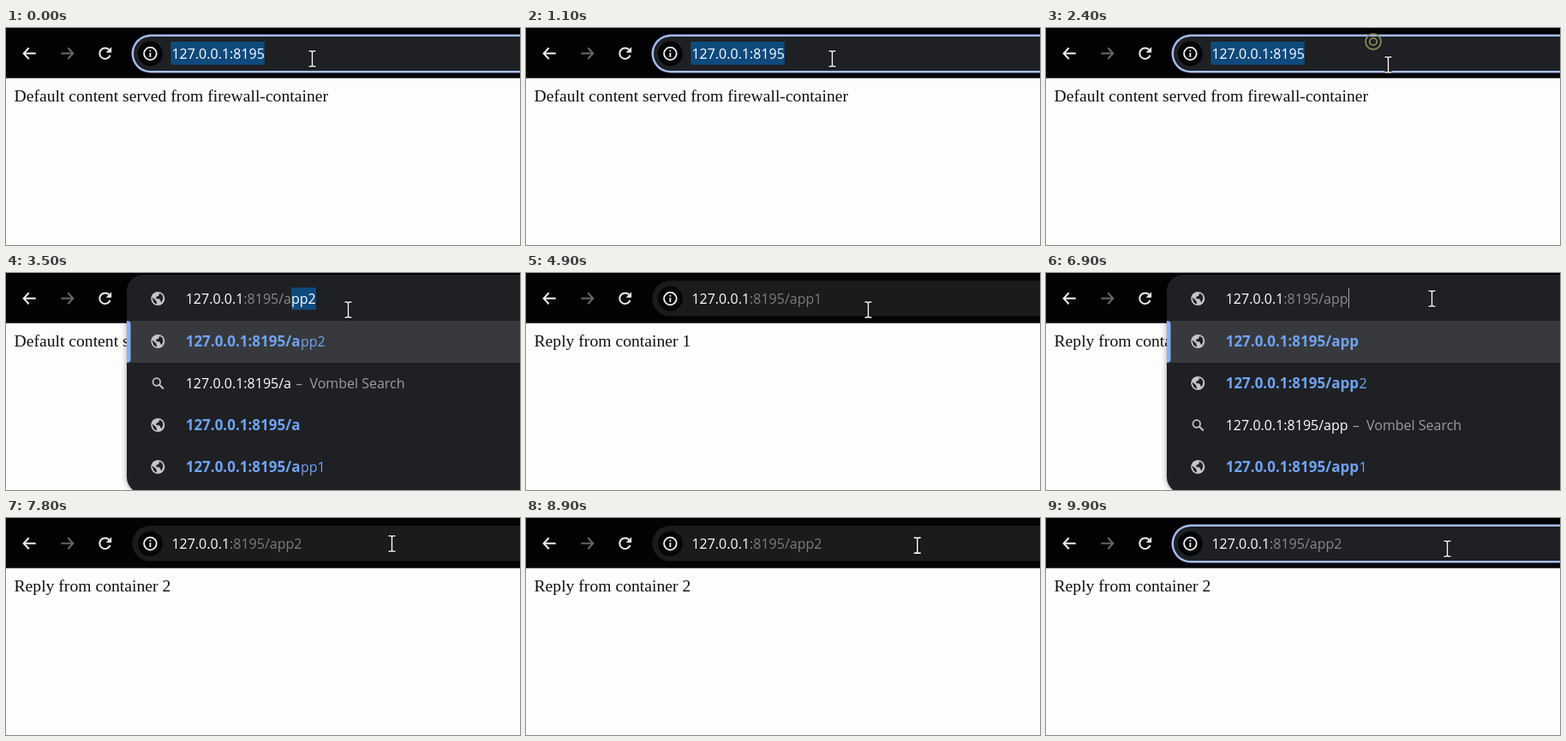
An HTML page with a canvas for the animation above (10000 ms loop, 600 by 254 pixels).

```html
<!DOCTYPE html>
<html lang="en">
<head>
<meta charset="utf-8">
<title>Routing by path</title>
<style>
html, body { margin: 0; width: 100%; height: 100%; overflow: hidden; background: #fefdfe; }
canvas { display: block; width: 600px; height: 254px; }
</style>
</head>
<body>
<canvas id="stage" width="600" height="254"></canvas>
<script>
const ctx = document.getElementById('stage').getContext('2d');
const LOOP = 10000, STEP = 100;
const HOST = '127.0.0.1', PORT = ':8195';
const UI = '16px "Open Sans", "Noto Sans", sans-serif';
const UI_BOLD = 'bold 17px "Open Sans", "Noto Sans", sans-serif';
const SERIF = '19.65px "Liberation Serif", serif';
const WHITE = '#ffffff', GREY = '#88898c', BLUE = '#6fa3f5', PANEL = '#1f2023', SELECT = '#0f4a7c';

// Each scene holds until the next one starts.
const scenes = [
  { at: 0, page: 'Default content served from firewall-container', path: '', focus: true, all: true },
  { at: 2900, typed: '/', rest: 'app2', rows: ['/app2', '?', '/', '/app1'] },
  { at: 3300, typed: '/a', rest: 'pp2', rows: ['/app2', '?', '/a', '/app1'] },
  { at: 3900, typed: '/ap', rest: 'p2', rows: ['/app2', '?', '/ap', '/app1'] },
  { at: 4000, typed: '/app', rest: '', rows: ['/app', '/app2', '?', '/app1'] },
  { at: 4400, typed: '/app1', rest: '', rows: ['/app1', '?'] },
  { at: 4600, page: 'Reply from container 1', path: '/app1' },
  { at: 5800, path: '/app1', focus: true, all: true },
  { at: 6100, path: '/app1', focus: true, caret: true },
  { at: 6400, typed: '/app', rest: '', rows: ['/app', '/app2', '?', '/app1'] },
  { at: 7100, typed: '/app2', rest: '', rows: ['/app2', '?'] },
  { at: 7300, page: 'Reply from container 2', path: '/app2' },
  { at: 9300, path: '/app2', focus: true }
];

// Pointer keys: time, x, y.
const pointer = [
  [0, 357, 36], [1700, 357, 36], [2100, 382, 16], [2200, 382, 16], [2400, 399, 43],
  [5500, 399, 43], [5800, 450, 30], [8700, 450, 30], [9200, 468, 36]
];

function pointerAt(t) {
  const i = pointer.findIndex(k => k[0] > t);
  if (i < 0) return pointer[pointer.length - 1].slice(1);
  const [t0, x0, y0] = pointer[i - 1], [t1, x1, y1] = pointer[i];
  const p = (t - t0) / (t1 - t0), e = p * p * (3 - 2 * p);
  return [x0 + (x1 - x0) * e, y0 + (y1 - y0) * e];
}

function rect(x, y, w, h, color) {
  ctx.fillStyle = color;
  ctx.fillRect(x, y, w, h);
}

function round(x, y, w, h, r, color) {
  ctx.beginPath();
  ctx.roundRect(x, y, w, h, r);
  ctx.fillStyle = color;
  ctx.fill();
}

function disc(x, y, r, color) {
  ctx.beginPath();
  ctx.arc(x, y, r, 0, 7);
  ctx.fillStyle = color;
  ctx.fill();
}

function circle(x, y, r, color, width) {
  ctx.beginPath();
  ctx.arc(x, y, r, 0, 7);
  stroke(color, width);
}

function stroke(color, width) {
  ctx.strokeStyle = color;
  ctx.lineWidth = width;
  ctx.stroke();
}

function line(points, color, width) {
  ctx.beginPath();
  points.forEach(([x, y]) => ctx.lineTo(x, y));
  stroke(color, width);
}

// Draws text and returns the x where it ends.
function write(str, x, y, color, font = UI) {
  ctx.font = font;
  ctx.fillStyle = color;
  ctx.fillText(str, x, y);
  return x + ctx.measureText(str).width;
}

function arrow(x, dir, color) {
  line([[x - 7 * dir, 29.7], [x + 7 * dir, 29.7]], color, 2);
  line([[x + dir, 23.2], [x + 7 * dir, 29.7], [x + dir, 36.2]], color, 2);
}

function reload() {
  ctx.beginPath();
  ctx.arc(115.6, 29.7, 6.3, 0.35, 5.5);
  stroke('#f2f2f2', 2);
  ctx.beginPath();
  ctx.moveTo(123.1, 22.2);
  ctx.lineTo(123.1, 28.7);
  ctx.lineTo(116.6, 28.7);
  ctx.fillStyle = '#f2f2f2';
  ctx.fill();
}

function infoIcon() {
  const x = 168.4, y = 30;
  disc(x, y, 14.5, '#050507');
  circle(x, y, 7.3, '#f2f2f2', 1.8);
  rect(x - 0.9, y - 1, 1.8, 5, '#f2f2f2');
  rect(x - 0.9, y - 4.2, 1.8, 1.8, '#f2f2f2');
}

function globe(x, y) {
  disc(x, y, 8, '#c4c5c8');
  ctx.beginPath();
  ctx.moveTo(x - 6.5, y - 1.5);
  ctx.lineTo(x - 2, y + 2.5);
  ctx.lineTo(x - 1, y + 6.4);
  ctx.quadraticCurveTo(x - 6.5, y + 5, x - 6.5, y - 1.5);
  ctx.moveTo(x + 2, y - 6.2);
  ctx.lineTo(x + 1, y - 3.5);
  ctx.lineTo(x - 2, y - 2);
  ctx.lineTo(x - 2, y);
  ctx.lineTo(x + 2, y + 0.5);
  ctx.lineTo(x + 4, y + 4.5);
  ctx.quadraticCurveTo(x + 9, y - 3, x + 2, y - 6.2);
  ctx.fillStyle = PANEL;
  ctx.fill();
}

function lens(x, y) {
  circle(x - 1.5, y - 1.5, 4.3, '#c4c5c8', 1.7);
  line([[x + 1.5, y + 1.5], [x + 6.5, y + 6.5]], '#c4c5c8', 2);
}

function caret(x) {
  rect(Math.round(x), 18, 1, 23, '#a8a8aa');
}

function addressBar(s) {
  if (s.focus) {
    round(146.5, 7.5, 480, 45, 22.5, '#a5bdf0');
    round(149, 10, 475, 40, 20, PANEL);
  } else {
    round(147.5, 9, 480, 41.5, 20.7, '#1b1a1c');
  }
  infoIcon();
  const x = 193.4;
  if (s.all) {
    const url = HOST + PORT + s.path;
    ctx.font = UI;
    rect(x - 1, 16, ctx.measureText(url).width + 1, 27, SELECT);
    write(url, x, 36, WHITE);
    return;
  }
  const grey = s.focus ? GREY : '#7d7d7f';
  const end = write(PORT + s.path, write(HOST, x, 36, WHITE), 36, grey);
  if (s.caret) caret(end);
}

function suggestion(row, typed, y) {
  const base = y + 6, x = 209.7;
  if (row === '?') {
    lens(177.3, y);
    const end = write(HOST + PORT + typed, x, base, WHITE);
    write(' –  Vombel Search', end + 1, base, '#9c9da0');
    return;
  }
  globe(177.3, y);
  const shared = row.startsWith(typed) ? typed : '/app';
  const end = write(HOST + PORT + shared, x, base, BLUE, UI_BOLD);
  write(row.slice(shared.length), end + 0.5, base, BLUE);
}

function dropdown(s) {
  ctx.save();
  ctx.shadowColor = 'rgba(0, 0, 0, 0.4)';
  ctx.shadowBlur = 7;
  round(141, 2, 490, 60 + 49 * s.rows.length, 19, PANEL);
  ctx.restore();
  rect(141, 56, 459, 49, '#38393c');
  round(141, 56, 4.5, 49, [0, 4, 4, 0], '#86b2f8');
  globe(177.3, 30);
  let end = write(HOST, 209.7, 36, WHITE);
  end = write(PORT + s.typed, end, 36, GREY);
  if (s.rest) {
    rect(end, 17, ctx.measureText(s.rest).width, 26, SELECT);
    write(s.rest, end, 36, WHITE);
  } else {
    caret(end);
  }
  s.rows.forEach((row, i) => suggestion(row, s.typed, 80 + 49 * i));
}

function beam(x, y) {
  const parts = [
    [[x, y - 8], [x, y + 8]],
    [[x - 4, y - 9], [x - 1, y - 9], [x, y - 8], [x + 1, y - 9], [x + 4, y - 9]],
    [[x - 4, y + 9], [x - 1, y + 9], [x, y + 8], [x + 1, y + 9], [x + 4, y + 9]]
  ];
  parts.forEach(p => line(p, '#000', 3.4));
  parts.forEach(p => line(p, '#f4f4f4', 1.6));
}

function clickRing(x, y) {
  circle(x, y, 9, '#8b875d', 1.8);
  circle(x, y, 4.2, '#8b875d', 1.8);
}

function draw(t) {
  const past = scenes.filter(s => s.at <= t);
  const scene = past[past.length - 1];
  const page = past.filter(s => s.page).pop().page;
  const [x, y] = pointerAt(t);

  rect(0, 0, 600, 254, '#fefdfe');
  rect(0, 0, 600, 58.7, '#030205');
  write(page, 9.5, 86.2, '#101010', SERIF);
  arrow(27.7, -1, '#f2f2f2');
  arrow(71.3, 1, '#68686a');
  reload();
  if (scene.rows) dropdown(scene);
  else addressBar(scene);
  if (t >= 2200 && t < 2600) clickRing(382, 16);
  beam(x + 0.5, y);
}

const start = performance.now();
function tick() {
  const t = (performance.now() - start) % LOOP;
  draw(Math.floor(t / STEP) * STEP);
  requestAnimationFrame(tick);
}
tick();
</script>
</body>
</html>
```
